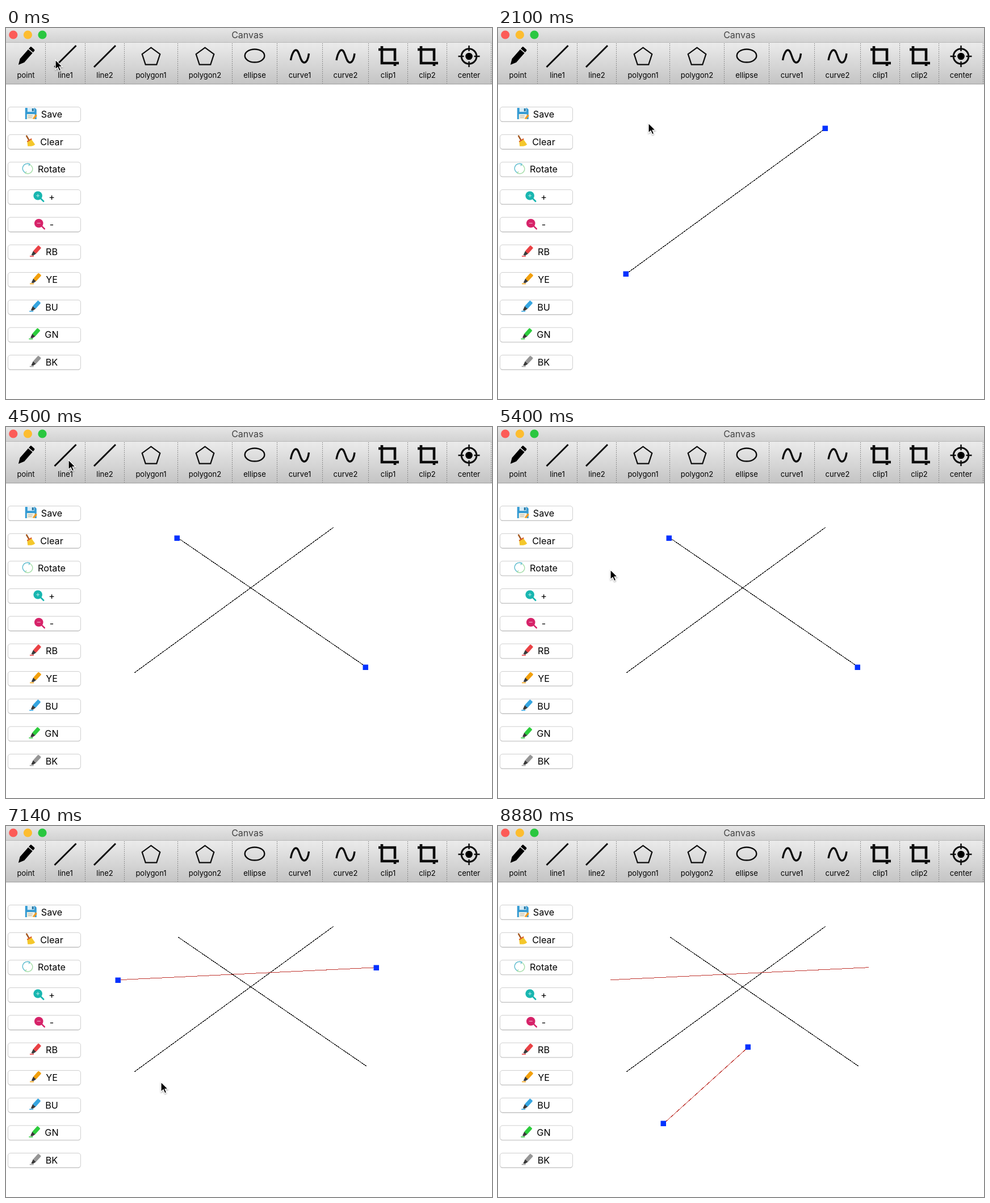
Write an HTML page that moves like this. It is 856 by 655 pixels and loops after 8.94 s.

```html
<!DOCTYPE html>
<html lang="en">
<head>
<meta charset="utf-8">
<title>Canvas</title>
<style>
html, body { margin: 0; width: 100%; height: 100%; overflow: hidden; background: #fff; }
svg { display: block; font-family: Inter, sans-serif; }
.ink { fill: none; stroke: #0c0c0c; stroke-width: 3; }
.label { font-size: 13px; text-anchor: middle; }
.button { font-size: 16.2px; }
</style>
</head>
<body>
<svg width="856" height="655" viewBox="0 0 856 655">
  <defs>
    <linearGradient id="title" x2="0" y2="1"><stop stop-color="#e6e6e6"/><stop offset="1" stop-color="#d2d2d2"/></linearGradient>
    <linearGradient id="bar" x2="0" y2="1"><stop stop-color="#ebebeb"/><stop offset="1" stop-color="#c4c4c4"/></linearGradient>
    <linearGradient id="press" x2="0" y2="1"><stop stop-color="#6cb3fa"/><stop offset="1" stop-color="#1a6fe8"/></linearGradient>
    <filter id="shade" x="-50%" y="-50%" width="200%" height="200%"><feDropShadow dx="0" dy="1.5" stdDeviation="1.2" flood-opacity=".35"/></filter>
  </defs>
  <rect width="856" height="25" fill="url(#title)"/>
  <rect y="25" width="856" height="1" fill="#b9b9b9"/>
  <rect y="26" width="856" height="73" fill="url(#bar)"/>
  <rect y="98.5" width="856" height="1" fill="#989898"/>
  <g id="lights"></g>
  <text x="425.3" y="18" font-size="16" text-anchor="middle" fill="#414141">Canvas</text>
  <g id="tools"></g>
  <g id="buttons"></g>
  <g id="drawing"></g>
  <path id="cursor" d="M0 0V17.2L4 13.5 6.8 19.8 9.7 18.5 7 12.4H12.3Z" stroke="#fff" stroke-width="1.2" filter="url(#shade)"/>
</svg>
<script>
const $ = id => document.getElementById(id);
const LOOP = 8940, STEP = 60;

$('lights').innerHTML = ['#fc5b57', '#fdbd2f', '#2ac740'].map((color, i) =>
  `<circle cx="${12.8 + 25.6 * i}" cy="12" r="7.6" fill="${color}"/>`).join('');

// Toolbar icons, centred on 0,0
const corners = [0, 1, 2, 3, 4].map(k => {
  const a = k * Math.PI * 2 / 5;
  return [16.6 * Math.sin(a), 1.2 - 16.6 * Math.cos(a)];
});
const ink = (width, d) => `<path class="ink" style="stroke-width:${width}" d="${d}"/>`;
const line = ink(3, 'M-19 19 19-19');
const pentagon = ink(2.2, `M${corners.join('L')}Z`);
const wave = ink(3.4, 'M-16 7C-14-5-10-11-7-11 0-11 0 11 8 11 12 11 15 4 16-5');
const crop = ink(4.6, 'M-11-18V12H19M-17-12H12V8M12 14V17');
const ellipse = '<ellipse class="ink" style="stroke-width:2.4" cy="-1" rx="17.3" ry="11.5"/>';
const target = `<circle class="ink" r="13.3"/>${ink(2.4, 'M0-19V-9M0 9V19M-19 0H-9M9 0H19')}<circle r="6.3"/>`;
const pencil = '<path transform="rotate(41)" d="M-5-12H5V10L0 20-5 10ZM-5-13.5V-17Q-5-19-3-19H3Q5-19 5-17V-13.5Z"/>';

// Name, cell width, icon
const tools = [
  ['point', 69, pencil], ['line1', 70, line], ['line2', 69, line],
  ['polygon1', 94, pentagon], ['polygon2', 96, pentagon], ['ellipse', 79, ellipse],
  ['curve1', 80, wave], ['curve2', 81, wave], ['clip1', 69, crop], ['clip2', 69, crop], ['center', 78, target]
];
let edge = 0;
$('tools').innerHTML = tools.map(([name, width, icon]) => {
  const x = edge + width / 2 + .5;
  edge += width;
  return `<g transform="translate(${x} 50)">${icon}</g><text class="label" x="${x}" y="88">${name}</text>
    <path d="M${edge + .5} 27V98" stroke="#777" stroke-dasharray="1.5 2"/>`;
}).join('');

// Side button icons, 20 px wide
const lens = (color, sign) =>
  `<path d="M4 4 9 9" stroke="${color}" stroke-width="2.6" stroke-linecap="round"/>
   <circle cx="-1" cy="-1" r="7.8" fill="${color}"/><path d="${sign}" stroke="#fff" stroke-opacity=".7"/>`;
const marker = color =>
  `<path d="M-10 8.5H-3" stroke="${color}" stroke-width="1.6"/>
   <g transform="rotate(42)"><path d="M-3.5 2H3.5L2 8-1 10Z" fill="#3a3a3a"/>
   <rect x="-3.5" y="-11.5" width="7" height="14" rx="1.5" fill="${color}"/></g>`;
const disk =
  `<path d="M-10-10H7L10-7V10H-10Z" fill="#359bd3"/><path d="M-6-10H6V-3H-6Z" fill="#d9eef8"/>
   <path d="M2-9H5V-4H2Z" fill="#26749f"/><path d="M-7 1H7V10H-7Z" fill="#f4f1df"/>
   <path d="M-5 4H3M-5 7H2" stroke="#aaa"/><path d="M3 9 9 1 11 4 6 10Z" fill="#f39a20"/>`;
const broom =
  `<path d="M-6-9-2-2" stroke="#a65a22" stroke-width="2.6" stroke-linecap="round"/>
   <path d="M-5 0 2-4 9 6Q4 10-4 9Z" fill="#f4c72b"/><path d="M-5 1 3-4" stroke="#d95b2b" stroke-width="2"/>`;
const cycle =
  `<g fill="none" stroke-width="1.5"><path d="M-4 7A8 8 0 0 1 3-8M0-9 4-8 2-5" stroke="#65bfd0"/>
   <path transform="rotate(180)" d="M-4 7A8 8 0 0 1 3-8M0-9 4-8 2-5" stroke="#a9dfad"/></g>`;

const buttons = [
  ['Save', disk], ['Clear', broom], ['Rotate', cycle],
  ['+', lens('#18b6b0', 'M-4-1H2M-1-4V2')], ['-', lens('#d62369', 'M-4-1H2')],
  ['RB', marker('#ea4145')], ['YE', marker('#f2a00c')], ['BU', marker('#36a5e0')],
  ['GN', marker('#2ccc3c')], ['BK', marker('#969696')]
];
$('buttons').innerHTML = buttons.map(([name, icon], i) =>
  `<g transform="translate(0 ${152 + 48.67 * i})">
   <rect x="3.5" y="-12" width="128" height="26" rx="4.5" fill="#bbb"/>
   <rect class="face" x="3.5" y="-12.5" width="128" height="25.5" rx="4.5" fill="#fff" stroke="#cfcfcf"/>
   <g class="content"><g transform="translate(10 -1)">${icon}</g><text class="button" x="28" y="6">${name}</text></g></g>`).join('');
for (const content of document.querySelectorAll('.content')) {
  const width = 28 + content.querySelector('text').getComputedTextLength();
  content.setAttribute('transform', `translate(${66.5 - width / 2})`);
}
const redButton = $('buttons').children[5];

// Each stroke runs between two clicks
const BLACK = '#000', RED = '#bf352f';
const strokes = [
  { a: [225, 434], b: [576, 177], at: 420, done: 900, color: BLACK },
  { a: [301, 196], b: [633, 424], at: 2700, done: 3180, color: BLACK },
  { a: [197, 272], b: [652, 250], at: 5520, done: 6000, color: RED },
  { a: [291, 525], b: [440, 390], at: 7320, done: 7920, color: RED }
];
const handle = ([x, y]) => `<rect x="${x - 4.5}" y="${y - 4.5}" width="9.5" height="9.5" fill="#0432ff"/>`;
const inset = ([x, y]) => [x + 1.5, y - .3];

function drawing(t) {
  const shown = strokes.filter(s => t >= s.at);
  const parts = shown.filter(s => t >= s.done).map(({ a, b, color }) =>
    `<path d="M${inset(a)}L${inset(b)}" stroke="${color}" shape-rendering="crispEdges"/>`);
  const last = shown.at(-1);
  if (last) parts.push(handle(last.a), t >= last.done ? handle(last.b) : '');
  return parts.join('');
}

// The pointer rests at each click and wanders through a few places between
const HOLD = 60, PRESS = 4050;
const rest = (t, [x, y]) => [[t - HOLD, x, y], [t + HOLD, x, y]];
const stops = [
  ...strokes.flatMap(s => [...rest(s.at, s.a), ...rest(s.done, s.b)]),
  ...rest(2370, [176, 58]), ...rest(PRESS, [84, 398]), ...rest(4560, [110, 58]), ...rest(6720, [174, 58]),
  [0, 87, 56], [1320, 600, 182], [2100, 265, 168], [3600, 221, 236], [4980, 385, 466],
  [5400, 198, 252], [6180, 677, 242], [6540, 231, 97], [8160, 441, 390], [8640, 425, 665], [LOOP, 425, 665]
].sort((p, q) => p[0] - q[0]);

function pointer(t) {
  const i = stops.findIndex(s => s[0] > t);
  const [t0, x0, y0] = stops[i - 1], [t1, x1, y1] = stops[i];
  const p = (t - t0) / (t1 - t0), e = p * p * (3 - 2 * p);
  return [x0 + (x1 - x0) * e, y0 + (y1 - y0) * e];
}

const start = performance.now();
function frame() {
  const t = Math.floor((performance.now() - start) % LOOP / STEP) * STEP;
  const pressed = Math.abs(t - PRESS) < HOLD;
  $('drawing').innerHTML = drawing(t);
  $('cursor').setAttribute('transform', `translate(${pointer(t).map(Math.round)})`);
  redButton.querySelector('.face').setAttribute('fill', pressed ? 'url(#press)' : '#fff');
  redButton.querySelector('text').setAttribute('fill', pressed ? '#fff' : '#000');
  requestAnimationFrame(frame);
}
frame();
</script>
</body>
</html>
```
